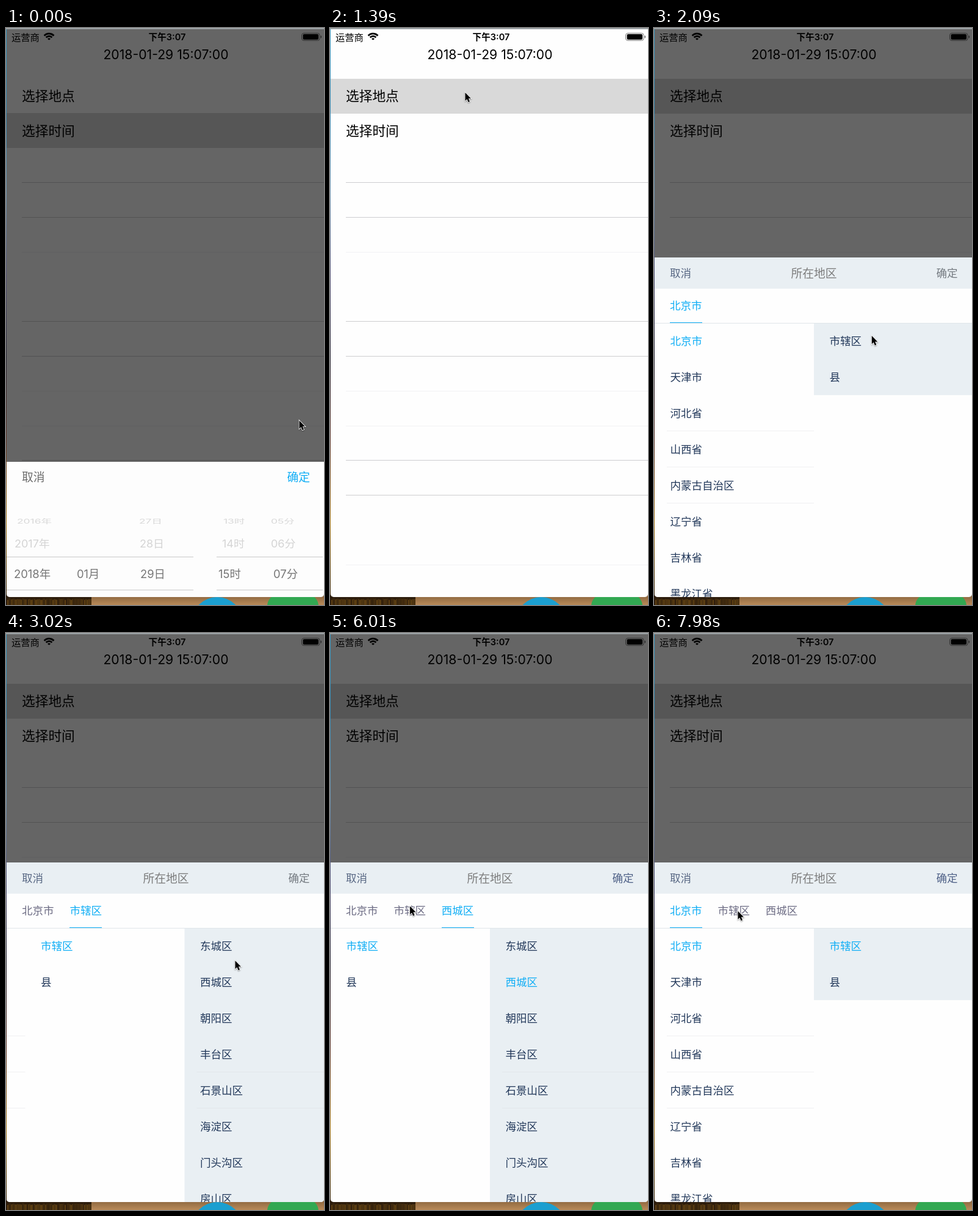
Recreate the animation shown at these times as an HTML page with a canvas. Size 521 by 943 pixels, loop 8 s.

```html
<!DOCTYPE html>
<html lang="zh">
<head>
<meta charset="utf-8">
<style>
html, body { margin: 0; width: 521px; height: 943px; overflow: hidden; }
canvas { display: block; }
</style>
</head>
<body>
<canvas id="stage" width="521" height="943"></canvas>
<script>
const c = document.getElementById('stage').getContext('2d');
const LOOP = 8000, COL = 261, ROW = 59;
const FONT = 'Inter, "Noto Sans CJK SC", "Noto Sans CJK", "Noto Sans", sans-serif';
const CYAN = '#10aef5', NAVY = '#22385a', PALE = '#e9eff3', SLATE = '#596884', MUTED = '#6d6c84';

const provinces = ['北京市', '天津市', '河北省', '山西省', '内蒙古自治区', '辽宁省', '吉林省', '黑龙江省'];
const cities = ['市辖区', '县'];
const districts = ['东城区', '西城区', '朝阳区', '丰台区', '石景山区', '海淀区', '门头沟区', '房山区'];

// pointer path: time, x, y
const path = [
  [60, 480, 641], [200, 526, 560], [420, 526, 400], [620, 430, 170], [820, 297, 84],
  [940, 297, 84], [1150, 221, 105], [1640, 221, 105], [2180, 383, 581], [2210, 383, 581],
  [2570, 375, 535], [3050, 375, 535], [3490, 345, 521], [4150, 345, 521], [4350, 340, 586],
  [4510, 331, 569], [4750, 331, 569], [5410, 133, 446], [5800, 131, 446], [6010, 131, 446],
  [6190, 54, 453], [6370, 130, 450], [6660, 130, 450], [7200, 65, 455], [7450, 65, 455],
  [7960, 137, 454]
];

const clamp = v => Math.max(0, Math.min(1, v));

// cubic-bezier(.42, 0, .58, 1)
function ease(x) {
  let lo = 0, hi = 1;
  for (let i = 0; i < 16; i++) {
    const u = (lo + hi) / 2;
    if (1.26 * u * (1 - u) ** 2 + 1.74 * u * u * (1 - u) + u ** 3 < x) lo = u; else hi = u;
  }
  return lo * lo * (3 - 2 * lo);
}
const tween = (t, start, length) => {
  const x = clamp((t - start) / length);
  return x === 0 || x === 1 ? x : ease(x);
};

function rect(x, y, w, h, color) {
  c.fillStyle = color;
  c.fillRect(x, y, w, h);
}
function round(x, y, w, h, r, color) {
  c.fillStyle = color;
  c.beginPath();
  c.roundRect(x, y, w, h, r);
  c.fill();
}
function text(str, x, y, size, color, align = 'left', weight = 400) {
  c.font = `${weight} ${size}px ${FONT}`;
  c.fillStyle = color;
  c.textAlign = align;
  c.textBaseline = 'alphabetic';
  c.fillText(str, x, y + size * 0.37);
}
function gradient(x, y, x2, y2, colors) {
  const g = c.createLinearGradient(x, y, x2, y2);
  colors.forEach((color, i) => g.addColorStop(i / (colors.length - 1), color));
  return g;
}

function desktop() {
  rect(0, 0, 1, 943, gradient(0, 0, 0, 943,
    ['#3c9cc4', '#3c8cb4', '#7298b4', '#565478', '#262432', '#5c3428', '#a87a18', '#2c1c08']));
  rect(0, 0, 521, 2, '#9da3a6');
  rect(0, 925, 140, 18, '#2c1c0c');
  let seed = 7;
  for (let x = 0; x < 140; x += 2) {
    seed = seed * 16807 % 2147483647;
    const v = seed / 2147483647;
    rect(x, 931 + v * 4, 2, 12, `rgba(150, 105, 25, ${v * 0.5})`);
  }
  rect(140, 925, 381, 18, gradient(0, 928, 0, 943, ['#8d673f', '#b98a59']));
  c.fillStyle = '#1b9fd0';
  c.beginPath();
  c.arc(346, 972, 42, 0, 7);
  c.fill();
  round(428, 925, 84, 84, 20, '#32a852');
}

function statusBar() {
  text('运营商', 9, 15, 15.3, '#000');
  text('下午3:07', 264, 15, 14.6, '#000', 'center', 600);
  c.strokeStyle = '#000';
  c.lineWidth = 2.8;
  for (const r of [10.8, 6.6, 2]) {
    c.beginPath();
    c.arc(70.5, 20, r, -Math.PI * 0.76, -Math.PI * 0.24);
    c.stroke();
  }
  c.strokeStyle = '#777';
  c.lineWidth = 1;
  c.beginPath();
  c.roundRect(484.5, 8.5, 29.5, 12, 3.5);
  c.stroke();
  round(486.5, 10, 25.5, 9, 2, '#000');
  round(515.5, 12.5, 1.5, 4, 1, '#777');
}

function page(t) {
  rect(1, 2, 520, 928, '#fefefe');
  for (let k = 0; k < 12; k++) {
    if (k === 3 || k === 10) continue;
    const faint = [2, 6, 7, 11].includes(k);
    rect(26, Math.round(252 + k * 56.8), 495, 1, faint ? '#f2f2f4' : '#cdcdd0');
  }
  if (t < 1380) rect(1, 139, 520, 57, '#d9d9d9');
  else rect(1, 83, 520, 57, '#d9d9d9');
  statusBar();
  text('2018-01-29 15:07:00', 262, 43, 21.2, '#000', 'center');
  text('选择地点', 26, 111, 21.7, '#000');
  text('选择时间', 26, 168, 21.7, '#000');
}

function timePicker() {
  rect(1, 709, 520, 221, '#fdfdfd');
  text('取消', 26, 734, 18.8, '#6b6b6b');
  text('确定', 498, 734, 18.8, CYAN, 'right');
  for (const y of [864, 918]) {
    rect(1, y, 306, 1, '#c9c9c9');
    rect(345, y, 174, 1, '#c9c9c9');
  }
  const row = (y, size, color, squash, cells) => {
    c.save();
    c.translate(0, y);
    c.scale(1, squash);
    for (const [str, x] of cells) text(str, x, 0, size, color);
    c.restore();
  };
  row(806, 17.4, '#d8d8d8', 0.6, [['2016年', 18], ['27日', 218], ['13时', 356], ['05分', 434]]);
  row(843, 18, '#d4d4d4', 0.95, [['2017年', 14], ['28日', 219], ['14时', 354], ['06分', 434]]);
  row(892, 18.4, '#777', 1, [['2018年', 13], ['01月', 116], ['29日', 220], ['15时', 348], ['07分', 438]]);
}

function list(items, x, picked, bg, lines) {
  rect(x, 483, COL, Math.min(items.length * ROW - 1, 447), bg);
  for (const y of lines) rect(x + 20, y, COL - 20, 1, bg === PALE ? '#e2e7eb' : '#f0f0f2');
  items.forEach((name, i) => text(name, x + 25.5, 511.5 + i * ROW, 17.5, i === picked ? CYAN : NAVY));
}

function areaPicker(t) {
  const count = t < 2800 ? 1 : t < 3690 ? 2 : 3;
  const active = t < 2800 ? 0 : t < 3690 ? 1 : t < 6600 ? 2 : t < 7340 ? 1 : 0;
  const district = t < 3690 ? -1 : t < 4710 ? 0 : 1;
  const scroll = COL * (tween(t, 2800, 290) - tween(t, 7340, 300));

  rect(1, 375, 520, 51, PALE);
  text('取消', 26, 401, 17.5, SLATE);
  text('所在地区', 262, 401, 18.8, '#7d7d7d', 'center');
  text('确定', 497.5, 401, 17.5, district < 0 ? '#747a80' : '#4f6187', 'right');

  rect(1, 426, 520, 504, '#fefefe');
  ['北京市', '市辖区', districts[district]].slice(0, count).forEach((name, i) => {
    const x = 26 + i * 78.4;
    text(name, x, 453.5, 17.5, i === active ? CYAN : MUTED);
    if (i === active) rect(Math.round(x), 481, 53, 1, CYAN);
  });
  rect(1, 482, 520, 1, '#e0e5e9');

  list(provinces, 1 - scroll, 0, '#fefefe', [658, 717, 776]);
  list(cities, 1 + COL - scroll, t < 2800 ? -1 : 0, active ? '#fefefe' : PALE, []);
  list(districts, 1 + 2 * COL - scroll, district, PALE, [717, 776]);
}

// slides a panel up from the window's bottom edge while the page dims
function sheet(shown, height, draw) {
  if (!shown) return;
  rect(1, 2, 520, 928, `rgba(0, 0, 0, ${0.6 * shown})`);
  c.save();
  c.translate(0, Math.round((1 - shown) * height));
  draw();
  c.restore();
}

function pointer(t) {
  let i = path.findIndex(p => p[0] > t);
  if (i < 0) i = path.length;
  const a = path[Math.max(0, i - 1)], b = path[Math.min(i, path.length - 1)];
  const u = clamp((t - a[0]) / (b[0] - a[0] || 1));
  c.save();
  c.translate(a[1] + (b[1] - a[1]) * u, a[2] + (b[2] - a[2]) * u);
  c.beginPath();
  [[0.5, 0.5], [0.5, 14], [3.5, 11.2], [5.6, 16.2], [8, 15.2], [5.9, 10.3], [10, 10.2]]
    .forEach(p => c.lineTo(...p));
  c.closePath();
  c.shadowColor = 'rgba(0, 0, 0, .4)';
  c.shadowBlur = 2;
  c.shadowOffsetY = 1;
  c.lineWidth = 1.6;
  c.strokeStyle = '#fff';
  c.stroke();
  c.shadowColor = 'transparent';
  c.fillStyle = '#000';
  c.fill();
  c.restore();
}

const start = performance.now();
function frame() {
  const t = Math.max(0, performance.now() - start) % LOOP;
  desktop();
  c.save();
  c.beginPath();
  c.roundRect(1, 2, 520, 928, [0, 0, 5, 5]);
  c.clip();
  page(t);
  sheet(1 - tween(t, 50, 300), 221, timePicker);
  sheet(tween(t, 1500, 400), 555, () => areaPicker(t));
  c.restore();
  pointer(t);
  requestAnimationFrame(frame);
}
frame();
</script>
</body>
</html>
```
